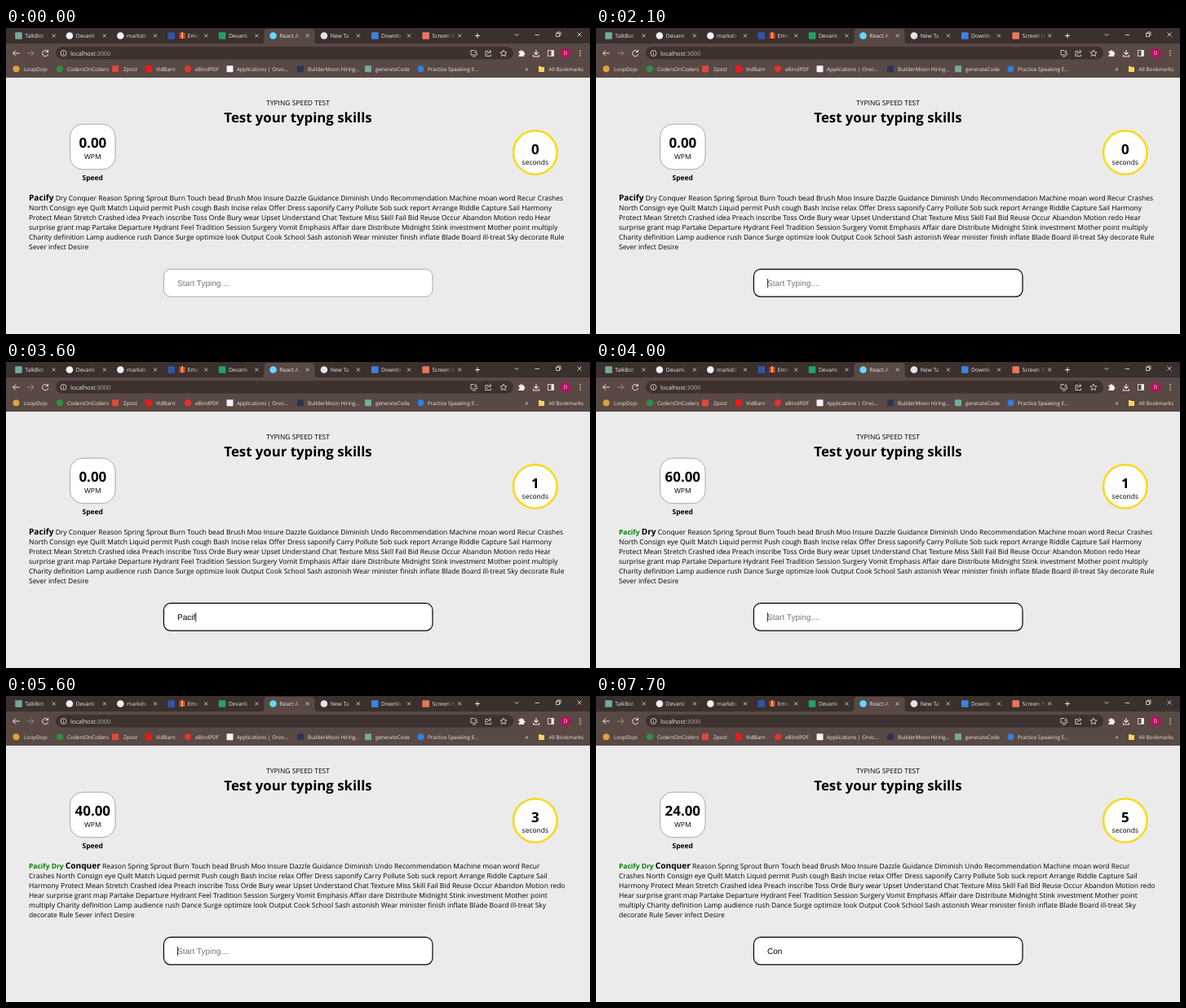
Recreate the animation shown at these times as an HTML page. Size 716 by 376 pixels, loop 8 s.

```html
<!DOCTYPE html>
<html lang="en">
<head>
<meta charset="utf-8">
<title>Typing speed test</title>
<style>
  html, body { margin: 0; width: 100%; height: 100%; overflow: hidden; background: #ebebeb; }
  svg { display: block; width: 716px; height: 376px; }
  text {
    font: 8.47px "Open Sans", "Noto Sans", sans-serif;
    text-rendering: geometricPrecision;
    white-space: pre;
  }
  .mid { text-anchor: middle; }
  .bold, .done { font-weight: 700; }
  .done { fill: #008000; }
  .now { font-weight: 700; font-size: 10.15px; }
  .num { font-weight: 700; font-size: 16.9px; text-anchor: middle; }
  .field { font: 10.05px "Liberation Sans", Arial, sans-serif; }
  .ui { fill: #ece6e4; font-size: 6.4px; }
  .tab { font-size: 6.8px; }
  .line { fill: none; stroke: #ece6e4; stroke-width: .8; }
</style>
</head>
<body>
<svg viewBox="0 0 716 376">
  <defs>
    <linearGradient id="fade"><stop offset="0" stop-color="#3a302e" stop-opacity="0"/><stop offset="1" stop-color="#3a302e"/></linearGradient>
    <linearGradient id="fadeOn"><stop offset="0" stop-color="#594945" stop-opacity="0"/><stop offset="1" stop-color="#594945"/></linearGradient>
  </defs>
  <rect width="716" height="376" fill="#ebebeb"/>

  <rect width="716" height="20" fill="#3a302e"/>
  <rect y="19" width="716" height="42" fill="#594945"/>
  <path d="M313 19q3.500 0 3.500-4V5q0-4 4-4h54q4 0 4 4v10q0 4 3.500 4z" fill="#594945"/>
  <rect x="61" y="23" width="561" height="15.500" rx="7.750" fill="#3d3230"/>
  <g id="tabs"></g>
  <g id="marks"></g>

  <g class="line">
    <path d="M575 9.500h6M578 6.500v6" stroke-width="1"/>
    <path d="M623.500 7l2.500 2.500 2.500-2.500M648.500 8.500h5.500M674.500 6.500h4v4h-4zM676 6.500v-1.500h4v4h-1.500M700.500 5.500l5 5M705.500 5.500l-5 5"/>
    <path d="M16.500 31H8.500M12 27.500L8.500 31l3.500 3.500" stroke-width="1"/>
    <path d="M26 31h8M30.500 27.500L34 31l-3.500 3.500" stroke="#998b87" stroke-width="1"/>
    <path d="M51 28.800a3.600 3.600 0 1 0 .7 3.200M51.500 26.800v2.700h-2.700" stroke-width="1"/>
    <circle cx="70.500" cy="31" r="3.500"/><path d="M70.500 30.500v2.500M70.500 28.700v.8"/>
    <path d="M574 27.500h-4v5.500h7.500v-2M572 35h4M576 27v3.500M574.500 29.200l1.500 1.500 1.500-1.500"/>
    <path d="M591 28.500h-3v6h6.500v-2M590 32.500q.5-3.500 4-3.500M592.500 27l2.500 2-2.500 2"/>
    <path d="M610 27l1.200 2.600 2.800.3-2.100 1.900.6 2.800-2.500-1.400-2.500 1.400.6-2.800-2.100-1.900 2.800-.3z"/>
    <path d="M650 27v5M647.500 30l2.500 2.500 2.500-2.500M646.500 33v2h7v-2" stroke-width="1.100"/>
    <rect x="664.500" y="27.500" width="7" height="7"/>
  </g>
  <g fill="#f4efed">
    <path d="M628.500 28.500h2a1.300 1.300 0 0 1 2.600 0h2v2a1.300 1.300 0 0 1 0 2.600v1.900h-6.600v-1.900a1.300 1.300 0 0 0 0-2.600z"/>
    <rect x="668.500" y="27.500" width="3" height="7"/>
    <circle cx="704" cy="28" r=".8"/><circle cx="704" cy="31" r=".8"/><circle cx="704" cy="34" r=".8"/>
  </g>
  <circle cx="686" cy="31" r="6.300" fill="#b8105f"/>
  <text class="ui mid" x="686" y="33.300">D</text>
  <text class="ui" x="79" y="33.600" style="font-size:7.300px">localhost<tspan fill="#b9aeaa">:3000</tspan></text>
  <text class="ui" x="636.500" y="52.800" style="font-size:8px">»</text>
  <path d="M653 47h2.800l.8 1h3.400v6h-7z" fill="#fbd35c"/>
  <text class="ui" x="665.500" y="52.700">All Bookmarks</text>

  <text class="mid" x="358" y="94.700">TYPING SPEED TEST</text>
  <text class="mid bold" x="358" y="116" style="font-size:16.800px">Test your typing skills</text>

  <rect x="78.500" y="118.200" width="55.500" height="55.500" rx="15.500" fill="#fff" stroke="#888" stroke-width=".7"/>
  <text id="wpm" class="num" x="106.300" y="147"></text>
  <text class="mid" x="106.300" y="160.700">WPM</text>
  <text class="mid bold" x="106.300" y="186.500">Speed</text>

  <circle cx="648.800" cy="153" r="26.800" fill="#fff" stroke="#fad91c" stroke-width="2.600"/>
  <text id="sec" class="num" x="648.800" y="154.600"></text>
  <text class="mid" x="648.800" y="168.200">seconds</text>

  <g id="words"></g>

  <rect id="box" x="193.400" y="296.400" width="329.600" height="33.800" rx="8.500" fill="#fff"/>
  <text id="hint" class="field" x="210" y="316.700" fill="#757575">Start Typing....</text>
  <text id="typed" class="field" x="210" y="316.700"></text>
  <rect id="caret" y="308" width=".8" height="11"/>
</svg>

<script>
const $ = id => document.getElementById(id);

const dot = (x, y, r, fill) => `<circle cx="${x}" cy="${y}" r="${r}" fill="${fill}"/>`;
const square = (x, y, r, fill) =>
  `<rect x="${x - r}" y="${y - r}" width="${2 * r}" height="${2 * r}" rx=".8" fill="${fill}"/>`;

// Browser tabs: label, icon colour, icon shape
const tabs = [
  ['TalkBot', '#74aa9c', square], ['Devank', '#f2f2f2', dot], ['markdo', '#f2f2f2', dot],
  ['Eme', '#2f55a4', square], ['Devank', '#1fa463', square], ['React A', '#61dafb', dot],
  ['New Ta', '#e4e4e4', dot], ['Downlo', '#3b82e0', square], ['Screen R', '#e8775a', square],
];
const gift = x => `<path d="M${x} 6h7v7h-7z" fill="#d8403c"/><path d="M${x + 2.7} 5h1.600v8h-1.600z" fill="#f6c945"/>`;

$('tabs').innerHTML = tabs.map(([label, color, icon], i) => {
  const x = 62.4 * i, close = 58.6 + 62.2 * i, hasGift = label === 'Eme';
  return icon(15.5 + x, 9.5, 4.3, color) +
    (hasGift ? gift(212.5) : '') +
    `<text class="ui tab" x="${23.3 + x + (hasGift ? 12 : 0)}" y="12">${label}</text>` +
    `<rect x="${42 + x}" y="3" width="8" height="13" fill="url(#${i === 5 ? 'fadeOn' : 'fade'})"/>` +
    `<path class="line" d="M${close - 2} 7.500l4 4m0-4l-4 4"/>`;
}).join('');

// Bookmarks: icon x, text x, label, colour, shape
const marks = [
  [12.5, 22, 'LoopDojo', '#e0a040', dot],
  [66, 75, 'CodersOnCoders', '#2f8d46', dot],
  [134, 144, 'Zpost', '#e0483c', square],
  [175, 184, 'VidBarn', '#f01818', square],
  [223, 232, 'eBindPDF', '#e5322d', dot],
  [274.5, 283, 'Applications | Orvo...', '#f4f4f4', square],
  [361, 370, 'BuilderMoon Hiring...', '#2c3454', square],
  [444, 453, 'generateCode', '#74aa9c', square],
  [508.5, 517, 'Practice Speaking E...', '#2f80e0', dot],
];
$('marks').innerHTML = marks.map(([ix, x, label, color, icon]) =>
  icon(ix, 50.3, 4, color) + `<text class="ui" x="${x}" y="52.700">${label}</text>`).join('');

const words = `Pacify Dry Conquer Reason Spring Sprout Burn Touch bead Brush Moo Insure Dazzle Guidance
Diminish Undo Recommendation Machine moan word Recur Crashes North Consign eye Quilt Match Liquid
permit Push cough Bash Incise relax Offer Dress saponify Carry Pollute Sob suck report Arrange Riddle
Capture Sail Harmony Protect Mean Stretch Crashed idea Preach inscribe Toss Orde Bury wear Upset
Understand Chat Texture Miss Skill Fail Bid Reuse Occur Abandon Motion redo Hear surprise grant map
Partake Departure Hydrant Feel Tradition Session Surgery Vomit Emphasis Affair dare Distribute Midnight
Stink investment Mother point multiply Charity definition Lamp audience rush Dance Surge optimize look
Output Cook School Sash astonish Wear minister finish inflate Blade Board ill-treat Sky decorate Rule
Sever infect Desire`.split(/\s+/);

// Words that open a new line, before and after the second word is done
const breaks = [
  ['North', 'Protect', 'surprise', 'Charity', 'Sever'],
  ['Crashes', 'Harmony', 'Hear', 'multiply', 'decorate'],
];

function paragraph(done) {
  const starts = breaks[done > 1 ? 1 : 0];
  const lines = [[]];
  words.forEach((word, i) => {
    if (starts.includes(word)) lines.push([]);
    const kind = i < done ? 'done' : i === done ? 'now' : '';
    lines[lines.length - 1].push(kind ? `<tspan class="${kind}">${word}</tspan>` : word);
  });
  return lines.map((line, i) => `<text x="28" y="${211.8 + 12 * i}">${line.join(' ')}</text>`).join('');
}

const LOOP = 8000;
const steps = [
  [0, { focus: 0, caret: 0, text: '', sec: 0, done: 0 }],
  [1000, { focus: 1, caret: 1 }],
  [1500, { caret: 0 }],
  [2100, { caret: 1 }],
  [2500, { text: 'P' }],
  [2700, { text: 'Pa' }],
  [2900, { text: 'Pac' }],
  [3100, { text: 'Paci' }],
  [3500, { sec: 1 }],
  [3600, { text: 'Pacif' }],
  [3800, { text: 'Pacify' }],
  [4000, { text: '', done: 1 }],
  [4500, { sec: 2, caret: 0 }],
  [5000, { caret: 1 }],
  [5100, { text: 'D' }],
  [5400, { text: 'Dr' }],
  [5500, { text: 'Dry', sec: 3 }],
  [5600, { text: '', done: 2 }],
  [6200, { caret: 0 }],
  [6500, { sec: 4 }],
  [6600, { text: 'C', caret: 1 }],
  [6900, { text: 'Co' }],
  [7200, { text: 'Con' }],
  [7500, { sec: 5 }],
  [7700, { caret: 0 }],
];

let shownStep = -1, shownDone = -1;

function draw(time) {
  const past = steps.filter(([at]) => at <= time);
  if (past.length === shownStep) return;
  shownStep = past.length;
  const s = Object.assign({}, ...past.map(([, change]) => change));

  $('wpm').textContent = (s.sec ? s.done * 60 / s.sec : 0).toFixed(2);
  $('sec').textContent = s.sec;
  if (s.done !== shownDone) $('words').innerHTML = paragraph(shownDone = s.done);

  $('box').setAttribute('stroke', s.focus ? '#000' : '#8a8a8a');
  $('box').setAttribute('stroke-width', s.focus ? 1.2 : .7);
  $('typed').textContent = s.text;
  $('hint').style.display = s.text ? 'none' : '';
  $('caret').style.display = s.caret ? '' : 'none';
  $('caret').setAttribute('x', 210.1 + (s.text ? $('typed').getComputedTextLength() : 0));
}

const start = performance.now();
function tick() {
  draw((performance.now() - start) % LOOP);
  requestAnimationFrame(tick);
}
tick();
</script>
</body>
</html>
```
